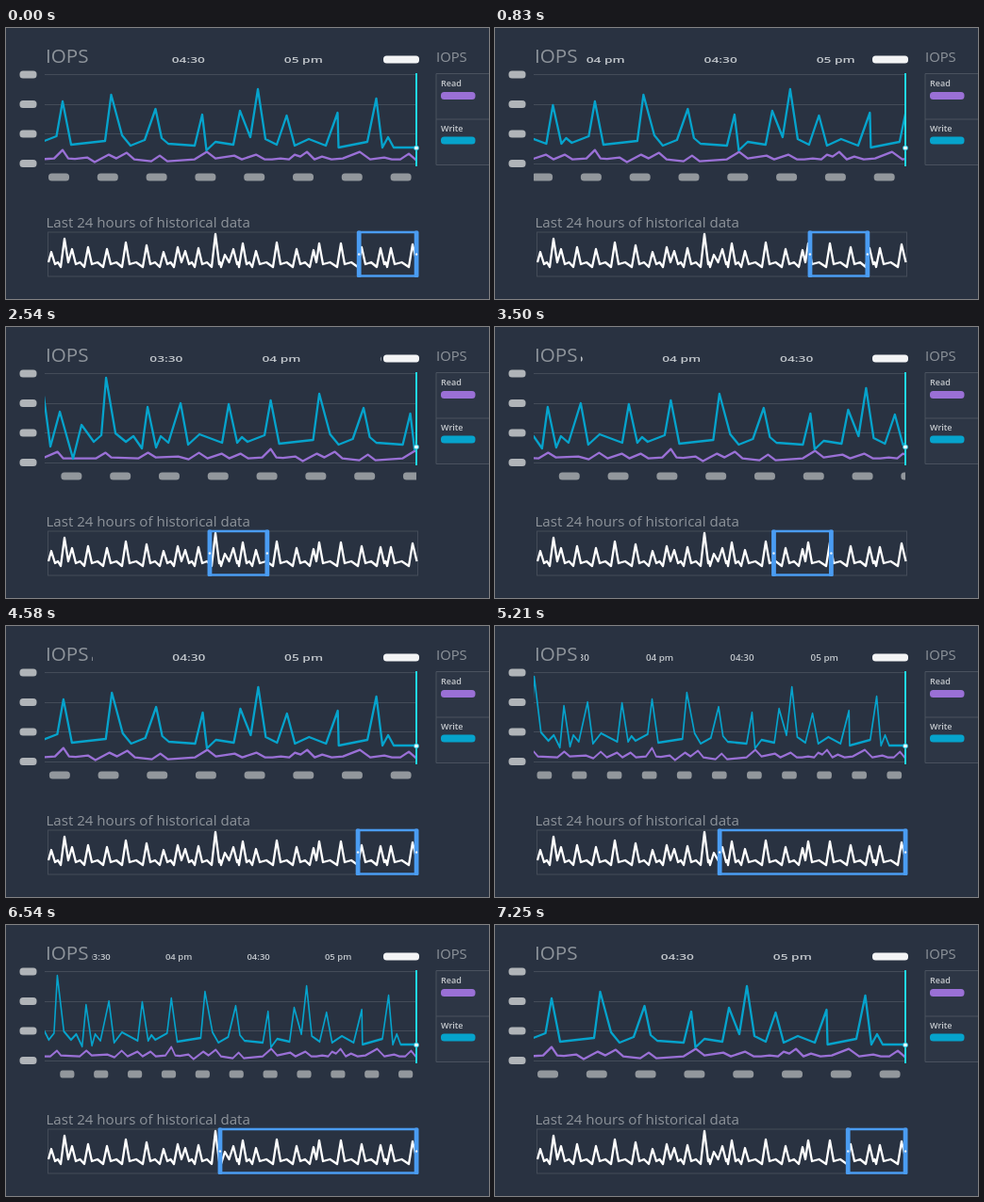
An HTML page that plays this animation: 512x288 px, repeating every 7750 ms.

```html
<!DOCTYPE html>
<html lang="en">
<head>
<meta charset="utf-8">
<title>IOPS history</title>
<style>
html, body { margin: 0; width: 100%; height: 100%; overflow: hidden; background: #293241; }
svg { display: block; width: 512px; height: 288px; font-family: "Open Sans", Lato, sans-serif; }
polyline { fill: none; stroke-width: 2.3; stroke-linejoin: round; }
.grid { stroke: #444c59; fill: none; }
.pill { fill: #92979c; }
.title { fill: #8e949b; font-weight: 500; }
.key { fill: #c6cace; font-size: 9px; font-weight: 600; }
.time { fill: #c3c8cd; font-size: 9.4px; font-weight: 600; text-anchor: middle; }
</style>
</head>
<body>
<svg viewBox="0 0 512 288">
  <clipPath id="plot"><rect x="41" y="40" width="394" height="130"/></clipPath>
  <clipPath id="times"><rect x="91" y="24" width="306.5" height="18"/></clipPath>

  <path class="grid" d="M41 49.5H435M41 81.5H435M41 112.5H435M41 144.5H435"/>
  <g id="axis" fill="#b0b4b8"></g>

  <g clip-path="url(#plot)"><g class="scroll">
    <g id="ticks" class="pill"></g>
    <polyline stroke="#9a70d6" transform="translate(0 .6)" points="-205,139 -180,138 -166,132 -160,139
      -125,139 -115,133 -109,138 -80,139 -70,133 -62,138 -38,137 -27,140 -16,133 -7,139 8,134 16,139
      28,134 36,139 51,138 60,129 66,138 73,138.5 86,137 94,142 109,134 117,138 128,132 136,139 154,141
      163,135 171,141 200,139 213,131 222,138 242,135 250,139 265,134 274,139 282,139 291,138 300,139
      306,134 312,136 319,131 327,139 335,136 345,139 357,138 375,131 386,139 401,137 409,139 418,139
      427,133 435,140"/>
    <polyline stroke="#06a3cc" points="-205,119 -187,122 -180.5,74 -173.5,127 -163.5,90 -149.5,140
      -140.5,104 -127.5,122 -119.5,115 -114.5,54 -104.5,113 -93.5,122 -85.5,116 -76.5,129 -70.5,85
      -61.5,128 -56.5,116 -48.5,123 -35.5,81 -27.5,125 -15.5,114 8.5,123 15.5,82 24.5,123 29.5,117
      35.5,122 53.5,115 60,78 69,124 105,120 111.5,71 123,114 132,125 147,119 158.5,86 165,117 172,123
      200,125 208,92 212.5,130 222,121 241,124 248,88 259,116 267,65 275,118 287,124 297.5,93 306,125
      321,118 339,125 351.5,90 352.5,127 383,121 392.5,75 399,127 405,116 411,127 435,127"/>
  </g></g>
  <g clip-path="url(#times)"><g class="scroll" id="labels"></g></g>

  <text class="title" x="42" y="37" font-size="20.6">IOPS</text>
  <rect x="400" y="29.5" width="38" height="8" rx="3.5" fill="#f3f4f5"/>
  <path d="M435 48V147" stroke="#20d8e6" stroke-width="2"/>
  <circle cx="435" cy="127.5" r="2.5" fill="#e8fbff" stroke="#20b8d0"/>

  <text class="title" x="456" y="36" font-size="14.8">IOPS</text>
  <path d="M456 48.5H520V145.5H456Z M456 97H520" fill="#2d3645" stroke="#4a525f"/>
  <text class="key" x="461" y="62">Read</text>
  <rect x="461" y="68" width="36.5" height="8" rx="3.5" fill="#9a70d6"/>
  <text class="key" x="461" y="110">Write</text>
  <rect x="461" y="115.5" width="36.5" height="8" rx="3.5" fill="#06a3cc"/>

  <text class="title" x="42.5" y="211.5" font-size="15.1">Last 24 hours of historical data</text>
  <rect class="grid" x="44.5" y="217" width="392" height="47"/>
  <polyline id="day" stroke="#fff"/>
  <g fill="#4a9cf2">
    <path id="rails" stroke="#4a9cf2" stroke-width="2.5"/>
    <rect class="side" y="215.5" width="4.8" height="49.5" rx="1.5"/>
    <rect class="side" y="215.5" width="4.8" height="49.5" rx="1.5"/>
    <circle class="dot" cy="240.5" r="1.2" fill="#e6f2ff"/>
    <circle class="dot" cy="240.5" r="1.2" fill="#e6f2ff"/>
  </g>
</svg>
<script>
const $ = id => document.getElementById(id);
const all = sel => [...document.querySelectorAll(sel)];
const pill = (cx, cy, w) =>
  `<rect x="${cx - w / 2}" y="${cy - 4}" width="${w}" height="8" rx="3.5"/>`;

$('axis').innerHTML = [49.5, 81, 112.5, 144].map(y => pill(23.5, y, 18)).join('');
for (let k = -5; k < 8; k++) $('ticks').innerHTML += pill(56 + 51.8 * k, 158.5, 22);
$('labels').innerHTML = ['03 pm', '03:30', '04 pm', '04:30', '05 pm', '05:30'].map((label, i) =>
  `<text class="time" transform="translate(${193.3 + 122 * (i - 3)} 36.5) scale(1.465 1)">${label}</text>`
).join('');

// Day overview: narrow peaks joined by low, slightly wavy valleys
const peaks = [[48, 238], [62, 224], [70, 235], [87, 233], [107, 235], [127, 228], [149, 231],
  [167, 238], [182, 233], [190, 237], [204, 234], [222, 219], [232, 241], [241, 235], [251, 229],
  [265, 237], [287, 228], [308, 235], [326, 236], [332, 229], [355, 229], [377, 233], [397, 234],
  [408, 234], [431, 230]];
const day = [[45, 249]];
peaks.forEach(([x, y], i) => {
  day.push([x, y]);
  const next = i + 1 < peaks.length ? peaks[i + 1][0] : 440;
  const mid = (x + next) / 2;
  if (next - x < 10) day.push([mid, 249]);
  else day.push([x + 4, 251], [mid, 249], [next - 4, 254]);
});
$('day').setAttribute('points', day.join(' '));

const scrolls = all('.scroll'), sides = all('.side'), dots = all('.dot');

// Cubic bezier ease with handles (x1, 0) and (x2, 1)
function ease(p, x1, x2) {
  if (p <= 0 || p >= 1) return p <= 0 ? 0 : 1;
  let lo = 0, hi = 1, u;
  for (let i = 0; i < 24; i++) {
    u = (lo + hi) / 2;
    const x = 3 * x1 * u * (1 - u) ** 2 + 3 * x2 * u * u * (1 - u) + u ** 3;
    if (x < p) lo = u; else hi = u;
  }
  return u * u * (3 - 2 * u);
}

function draw(now) {
  const tick = Math.floor(now % 7750 * 0.024 + 0.1);
  const move = (from, to, x1 = 0.33, x2 = 0.67) => ease((tick - from) / (to - from), x1, x2);

  const drag = move(10, 42, 0.33, 0.63) - move(53, 97, 0.5, 1);
  const pan = move(10, 42, 0.33, 0.796) - move(53, 97, 0.84, 0.79);
  const zoom = move(109, 129) - move(155, 174);
  const slide = move(129, 143) - move(143, 156);

  const scale = 1 - 0.3173 * zoom;
  const shift = 435 * (1 - scale) + 224.5 * pan + 36.4 * slide;
  for (const g of scrolls) g.setAttribute('transform', `matrix(${scale} 0 0 1 ${shift} 0)`);

  const right = 437.5 - 165 * drag - 46.6 * slide;
  const left = right - 65.7 - 152 * zoom;
  $('rails').setAttribute('d', `M${left + 1} 217H${right - 1}M${left + 1} 263.5H${right - 1}`);
  [left, right - 4.8].forEach((x, i) => {
    sides[i].setAttribute('x', x);
    dots[i].setAttribute('cx', x + 2.4);
  });
}

const start = performance.now();
function loop() {
  draw(performance.now() - start);
  requestAnimationFrame(loop);
}
loop();
</script>
</body>
</html>
```
